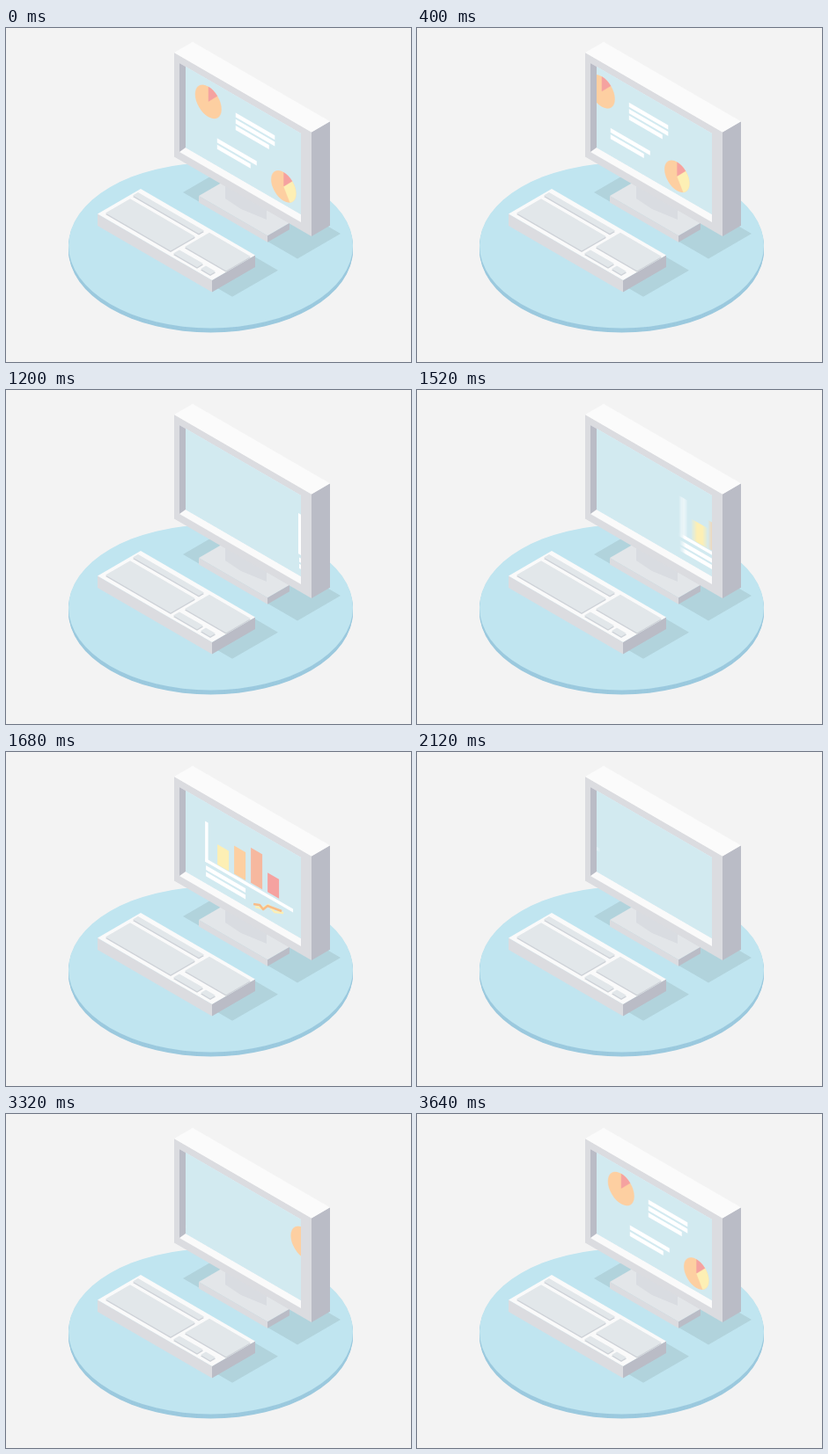
An HTML page with a canvas for the animation above (3680 ms loop, 460 by 380 pixels).

```html
<!DOCTYPE html>
<html lang="en">
<head>
<meta charset="utf-8">
<title>Isometric desktop</title>
<style>
html, body { margin: 0; width: 100%; height: 100%; overflow: hidden; background: #f3f3f3; }
canvas { display: block; }
</style>
</head>
<body>
<canvas id="stage" width="460" height="380"></canvas>
<script>
const W = 460, H = 380, LOOP = 3680, STEP = 40, SLOPE = 0.58;
const RED = '#f6a3a1', SALMON = '#f7b9a0', ORANGE = '#fdd0a2', YELLOW = '#fdefb5', WHITE = '#fff';
const LIGHT = '#fafafa', FACE = '#dbdce0', SIDE = '#babcc6', PANEL = '#e2e7ea';
const SCREEN = '#d3eaf1', SHADOW = '#b1d3dc';

const newCanvas = () => Object.assign(document.createElement('canvas'), { width: W, height: H });
const view = document.getElementById('stage').getContext('2d');
const backdrop = newCanvas().getContext('2d');
const layer = newCanvas().getContext('2d');

function trace(c, pts) {
  c.beginPath();
  for (const [x, y] of pts) c.lineTo(x, y);
}
function poly(color, ...pts) {
  trace(backdrop, pts);
  backdrop.fillStyle = color;
  backdrop.fill();
}

// Isometric pieces: x, y is the left corner, a runs right and down, b right and up
const upright = (x, y, a, h) => [[x, y], [x + a, y + SLOPE * a], [x + a, y + SLOPE * a + h], [x, y + h]];
function tile(color, x, y, a, b) {
  poly(color, [x, y], [x + b, y - SLOPE * b], [x + a + b, y + SLOPE * (a - b)], [x + a, y + SLOPE * a]);
}
function box(top, x, y, a, b, h) {
  const fx = x + a, fy = y + SLOPE * a;
  poly(FACE, ...upright(x, y, a, h));
  poly(SIDE, [fx, fy], [fx + b, fy - SLOPE * b], [fx + b, fy - SLOPE * b + h], [fx, fy + h]);
  tile(top, x, y, a, b);
}
function key(x, y, a, b) {
  tile('#cdd1d7', x, y + 1.5, a, b);
  tile(PANEL, x, y, a, b);
}
function disc(color, y) {
  backdrop.beginPath();
  backdrop.ellipse(232.5, y, 161.5, 94, 0, 0, 7);
  backdrop.fillStyle = color;
  backdrop.fill();
}

function drawBackdrop() {
  backdrop.fillStyle = '#f3f3f3';
  backdrop.fillRect(0, 0, W, H);
  for (let y = 252.5; y > 247.5; y--) disc('#9bc9de', y);
  disc('#c0e5f0', 247.5);
  tile(SHADOW, 201, 187, 130, 49);
  tile(SHADOW, 197, 271, 60, 52);

  // keyboard
  box(LIGHT, 104, 211.5, 130, 49, 13.5);
  key(113, 210.5, 74, 28);
  key(144, 190.5, 75, 6);
  key(203, 249, 47, 28);
  key(190, 256.5, 27, 7);
  key(221, 274, 11, 6);

  // stand
  box('#e3e6e9', 219, 191, 78, 25, 7.5);
  poly('#d9dce1', [249, 176], [296, 203], [296, 218], [267, 206], [249, 194]);

  // monitor
  box('#fbfbfb', 191, 28, 156, 21, 118.5);
  poly(LIGHT, ...upright(197, 40, 138, 101));
  poly(SIDE, [197, 40], [204, 44], [204, 136], [197, 141]);
}

// Shapes on the screen plane, moved by s along its horizontal axis
function place(x, y, s) {
  layer.setTransform(1, SLOPE, 0, 1, x + s, y + SLOPE * s);
}
function bar(s, color, x, y, w, h) {
  place(x, y, s);
  layer.fillStyle = color;
  layer.fillRect(0, 0, w, h);
}
function textLines(s, x, y, ...widths) {
  widths.forEach((w, i) => bar(s, WHITE, x, y + 7.3 * i, w, 5));
}
function axes(s, x, y, height) {
  bar(s, WHITE, x, y, 3.5, height);
  bar(s, WHITE, x, y + height - 4, 100, 4);
}
function slice(color, r, from, to) {
  layer.beginPath();
  layer.moveTo(0, 0);
  layer.ellipse(0, 0, r, r * 1.15, 0, from * Math.PI / 180, to * Math.PI / 180);
  layer.fillStyle = color;
  layer.fill();
}
function zigzag(s, color, width, ...pts) {
  layer.setTransform(1, 0, 0, 1, s, SLOPE * s);
  trace(layer, pts);
  layer.strokeStyle = color;
  layer.lineWidth = width;
  layer.lineJoin = 'round';
  layer.stroke();
}

function pies(s) {
  place(230, 84, s);
  slice(ORANGE, 15, 0, 360);
  slice(RED, 15, -90, -46);
  place(315.5, 180.5, s);
  slice(ORANGE, 14.2, 0, 360);
  slice(YELLOW, 14.2, -46, 60);
  slice(RED, 14.2, -90, -46);
  textLines(s, 261, 96.5, 44.5, 44.5, 38);
  textLines(s, 240, 125.5, 45, 38);
}

function barChart(s) {
  axes(s, 226, 78.5, 46);
  const bars = [[YELLOW, 23], [ORANGE, 32], [SALMON, 40], [RED, 22]];
  bars.forEach(([color, h], i) => bar(s, color, 240 + 19 * i, 128 + 10.4 * i - h, 13, h));
  textLines(s, 227, 129, 45, 45);
  zigzag(s, YELLOW, 2.5, [283, 176], [291, 178], [298, 174], [305, 182], [315, 183]);
  zigzag(s, '#f9bd88', 2.5, [281, 173], [288, 174], [292, 179], [297, 175], [313, 181]);
}

function lineChart(s) {
  axes(s, 223, 69, 72);
  zigzag(s, YELLOW, 3.5, [236, 136], [252, 131], [260, 141], [285, 140], [302, 165], [318, 160]);
  zigzag(s, RED, 3.5, [231, 136], [252, 127], [260, 132], [280, 124], [300, 150], [318, 146]);
}

// Each slide glides in from the right, rests or drifts, and speeds off to the left
const slides = [
  { draw: pies, from: 110, arrive: 3640, leave: 4240, gone: 4520, rest: 1.8, drift: 30 },
  { draw: barChart, from: 106, arrive: 1680, leave: 1880, gone: 2120, rest: 0, drift: 0 },
  { draw: lineChart, from: 106, arrive: 2880, leave: 3080, gone: 3320, rest: 0, drift: 0 }
];
const GLIDE = 520, EXIT = 124;
const clamp = v => Math.min(1, Math.max(0, v));
const lateSmooth = p => { const q = p ** 2.78; return q * q * (3 - 2 * q); };

function shiftOf({ from, arrive, leave, gone, rest, drift }, t) {
  const begin = arrive - GLIDE;
  if (t < begin) t += LOOP;
  if (t >= gone) return null;
  const inward = lateSmooth(clamp((t - begin) / GLIDE));
  const held = clamp((t - arrive) / (leave - arrive));
  const outward = clamp((t - leave) / (gone - leave)) ** 1.5;
  return from + (rest - from) * inward - drift * held - EXIT * outward;
}

function drawLayer(t) {
  layer.setTransform(1, 0, 0, 1, 0, 0);
  layer.fillStyle = SCREEN;
  layer.fillRect(0, 0, W, H);
  for (const slide of slides) {
    const s = shiftOf(slide, t);
    if (s !== null) slide.draw(s);
  }
}

function render(t) {
  view.drawImage(backdrop.canvas, 0, 0);
  view.save();
  trace(view, upright(204, 44, 131, 92));
  view.clip();
  // average several moments for motion blur
  const samples = 5, shutter = 14;
  for (let i = 0; i < samples; i++) {
    drawLayer((t + shutter * (i / (samples - 1) - 0.5) + LOOP) % LOOP);
    view.globalAlpha = 1 / (i + 1);
    view.drawImage(layer.canvas, 0, 0);
  }
  view.restore();
}

drawBackdrop();
const start = performance.now();
function tick() {
  const t = (performance.now() - start) % LOOP;
  render(Math.floor(t / STEP) * STEP);
  requestAnimationFrame(tick);
}
tick();
</script>
</body>
</html>
```
